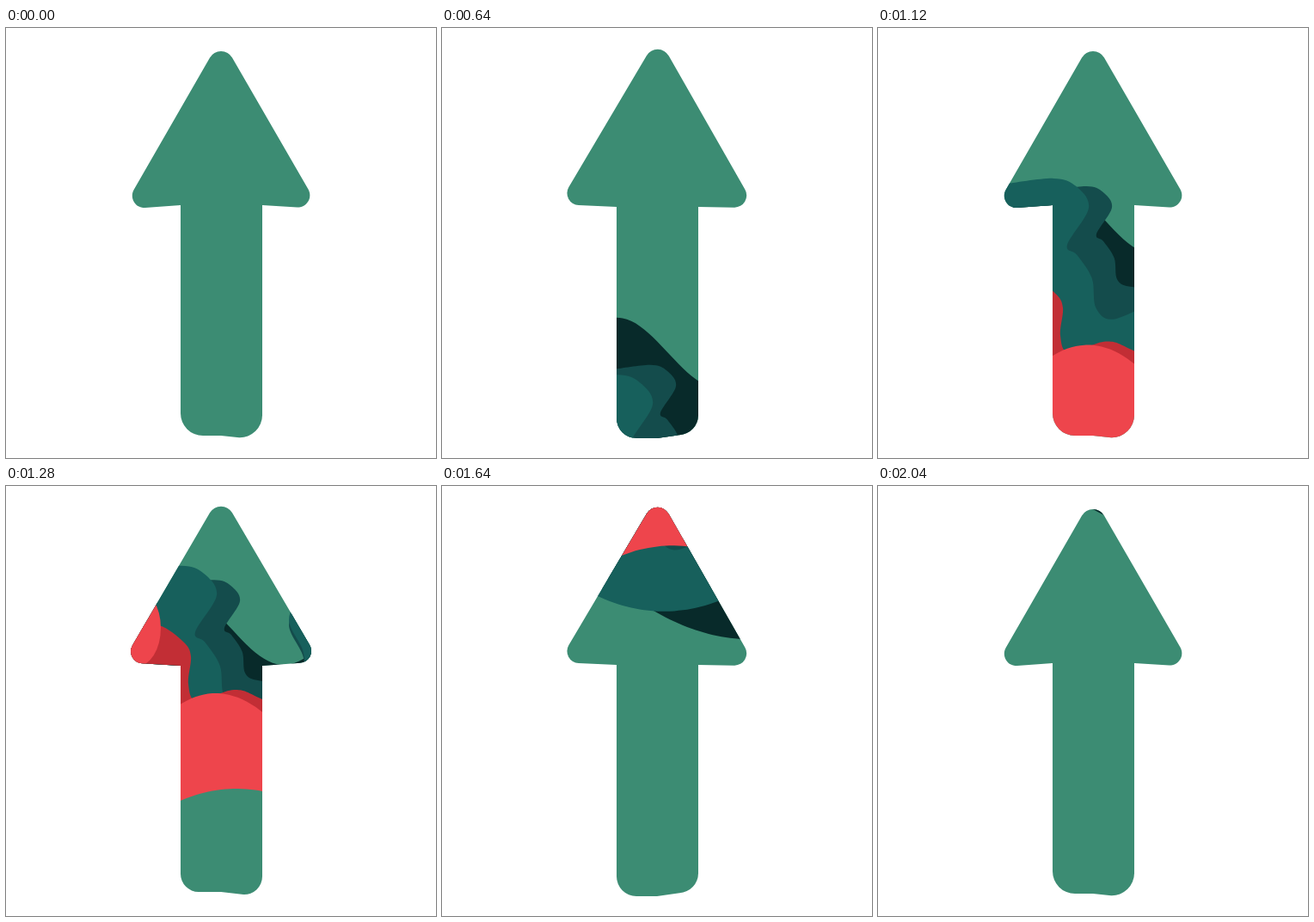
Write an HTML page with a canvas that moves like this. It is 500x500 px and loops after 2.08 s.

```html
<!DOCTYPE html>
<html lang="en">
<head>
<meta charset="utf-8">
<title>Rising waves in an arrow</title>
<style>
  html, body { margin: 0; width: 100%; height: 100%; overflow: hidden; background: #fff; }
  canvas { display: block; width: 100vw; height: 100vh; }
</style>
</head>
<body>
<canvas id="stage" width="500" height="500"></canvas>
<script>
const LOOP = 2080, STEP = 40, HOLD = 320, REST = 1280;
const LEFT = 203, RIGHT = 298;
const ctx = document.getElementById("stage").getContext("2d");

// Rounded arrow; wings, notch and feet give heights, r rounds the feet
function arrow({ tip: [x, y], wings, notch, feet, r }) {
  const corners = [
    [x, y, 15], [364.5, wings[1], 14], [RIGHT, notch, 0], [RIGHT, feet[1], r],
    [LEFT, feet[0], r], [LEFT, notch, 0], [135.5, wings[0], 14]
  ];
  const path = new Path2D();
  path.moveTo(250, feet[0]);
  for (let i = 0; i < corners.length; i++) {
    const [a, b, radius] = corners[(i + 4) % corners.length];
    const [c, d] = corners[(i + 5) % corners.length];
    path.arcTo(a, b, c, d, radius);
  }
  path.closePath();
  return path;
}

const poses = [
  { tip: [250, 12], wings: [211, 210], notch: 206, feet: [474, 477], r: 26 },
  { tip: [250, 9], wings: [205, 204], notch: 209, feet: [472, 476], r: 21 },
  { tip: [251, 10], wings: [205, 209], notch: 208, feet: [477, 472], r: 23 }
].map(arrow);

// Points of y = f(x) across the arrow
const graph = f => Array.from({ length: 27 }, (_, i) => [120 + i * 10, f(120 + i * 10)]);
const bow = (x0, y0, bend) => graph(x => y0 + bend * (x - x0) ** 2);

// Dripping edge: shoulder, lobe, neck, bulge and foot, then a lobe at the right
function drip(x, y, w, h, lift) {
  const shape = [[-4, -.7], [-1.65, -.88], [-.6, -.65], [0, 0], [-1, 1.1], [-.55, 1.4], [.15, 2.1], [.35, 3], [1.3, 3.3]];
  const tail = [[340, 228], [346, 200], [329, 162], [345, 135], [380, 130]];
  return [
    ...shape.map(([a, b]) => [x + a * w, y + b * h]),
    ...tail.map(([a, b]) => [a, b - lift])
  ];
}

// Smooth curve through the points
function spline(path, pts) {
  path.lineTo(...pts[0]);
  for (let i = 0; i < pts.length - 1; i++) {
    const b = pts[i], c = pts[i + 1], a = pts[i - 1] || b, d = pts[i + 2] || c;
    path.bezierCurveTo(
      b[0] + (c[0] - a[0]) / 6, b[1] + (c[1] - a[1]) / 6,
      c[0] - (d[0] - b[0]) / 6, c[1] - (d[1] - b[1]) / 6, ...c);
  }
}

function wave(fill, speed, top, bottom) {
  const path = new Path2D();
  spline(path, top);
  spline(path, bottom.reverse());
  path.closePath();
  return { fill, speed, path };
}

// Back to front, placed as they stand at REST
const swell = graph(x => 167 - 41 * Math.cos(Math.PI * (x - LEFT) / 120));
const crest = [[140, 160], [178, 162], [206, 181], [215, 198], [212, 230], [222, 250], [265, 237], [298, 248], [380, 290]];
const waves = [
  wave("#082a2a", 112, swell, bow(360, 302, -.00256)),
  wave("#144c4c", 150, drip(272, 134, 18, 28, 0), bow(250, 285, 0)),
  wave("#17605c", 165, drip(245, 127, 25, 39, 6), bow(258, 328, -.003)),
  wave("#c22e35", 256, crest, bow(250, 310, 0)),
  wave("#ee454c", 256, bow(244, 241, .0075), bow(268, 352, .0033))
];
const bump = new Path2D();
bump.ellipse(152, 165, 28, 45, 0, 0, 2 * Math.PI);
waves.push({ fill: "#ee454c", speed: 256, path: bump });

function draw(t) {
  // Soft start and end, fastest at REST
  const u = t - REST;
  const rise = (u - 1.433e-7 * u ** 3) / HOLD;

  ctx.clearRect(0, 0, 500, 500);
  ctx.save();
  ctx.clip(poses[Math.floor(t / HOLD) % poses.length]);
  ctx.fillStyle = "#3c8c73";
  ctx.fillRect(0, 0, 500, 500);
  for (const { fill, speed, path } of waves) {
    ctx.save();
    ctx.translate(0, -speed * rise);
    ctx.fillStyle = fill;
    ctx.fill(path);
    ctx.restore();
  }
  ctx.restore();
}

const start = performance.now();
function tick() {
  const t = (performance.now() - start) % LOOP;
  draw(Math.floor(t / STEP) * STEP);
  requestAnimationFrame(tick);
}
tick();
</script>
</body>
</html>
```
